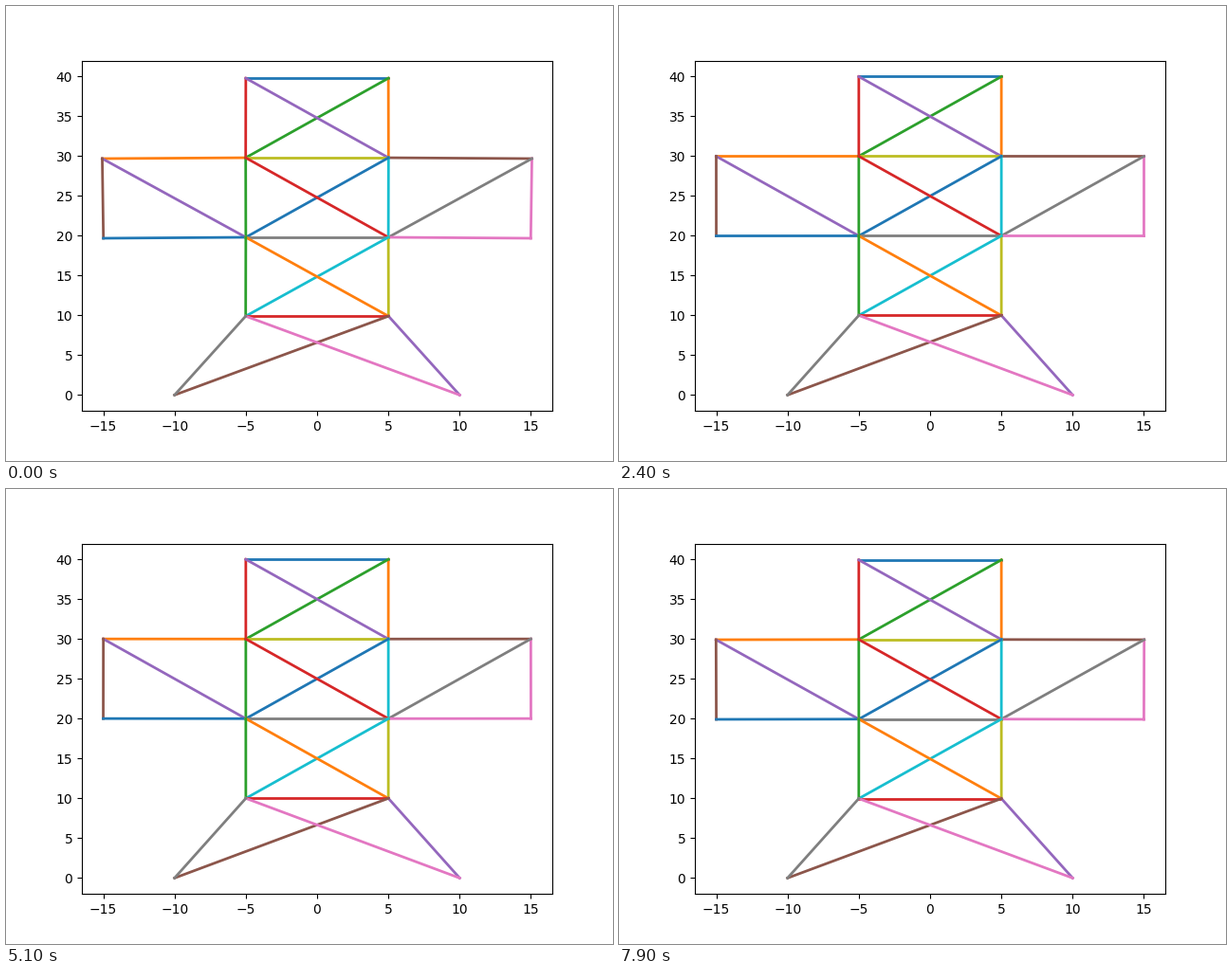
These frames come from a looping animation (640x480 px, 8 s). A matplotlib script:

```python
import numpy as np
import matplotlib.pyplot as plt
from matplotlib.animation import FuncAnimation

FRAMES = 80
PERIOD = 13.65  # frames per oscillation

# Right half of the truss: name -> (x, y, dx, dy), mirrored for the left half.
HALF = {
    "head": (5, 40, 0.0, -0.215),
    "shoulder": (5, 30, 0.01, -0.2),
    "waist": (5, 20, 0.0, -0.19),
    "hip": (5, 10, 0.01, -0.095),
    "wing": (15, 30, 0.07, -0.31),
    "tip": (15, 20, -0.01, -0.31),
    "foot": (10, 0, 0.0, 0.0),
}
REST, MODE = {}, {}
for name, (x, y, dx, dy) in HALF.items():
    for side, s in (("R", 1), ("L", -1)):
        REST[side + name] = np.array([s * x, y], float)
        MODE[side + name] = np.array([s * dx, dy])

# Bars in drawing order, so the default colour cycle applies.
BARS = """
Lhead-Rhead Rhead-Rshoulder Lshoulder-Rhead Lhead-Lshoulder Lhead-Rshoulder
Rshoulder-Rwing Rwing-Rtip Rwaist-Rwing Lshoulder-Rshoulder Rshoulder-Rwaist
Lwaist-Rshoulder Lwing-Lshoulder Lshoulder-Lwaist Lshoulder-Rwaist Lwing-Lwaist
Lwing-Ltip Rwaist-Rtip Lwaist-Rwaist Rwaist-Rhip Lhip-Rwaist
Ltip-Lwaist Lwaist-Rhip Lwaist-Lhip Lhip-Rhip Rhip-Rfoot
Rhip-Lfoot Lhip-Rfoot Lhip-Lfoot
"""
BARS = [bar.split("-") for bar in BARS.split()]

fig, ax = plt.subplots(figsize=(6.4, 4.8), dpi=100)
ax.set_xlim(-16.5, 16.5)
ax.set_ylim(-2, 42)
lines = [ax.plot([], [], lw=2)[0] for _ in BARS]


def update(i):
    q = np.cos(2 * np.pi * i / PERIOD)
    for line, ends in zip(lines, BARS):
        pts = np.array([REST[n] + q * MODE[n] for n in ends])
        line.set_data(pts[:, 0], pts[:, 1])
    return lines


anim = FuncAnimation(fig, update, frames=FRAMES, interval=100,
                     repeat=True, repeat_delay=0)
plt.show()
```
